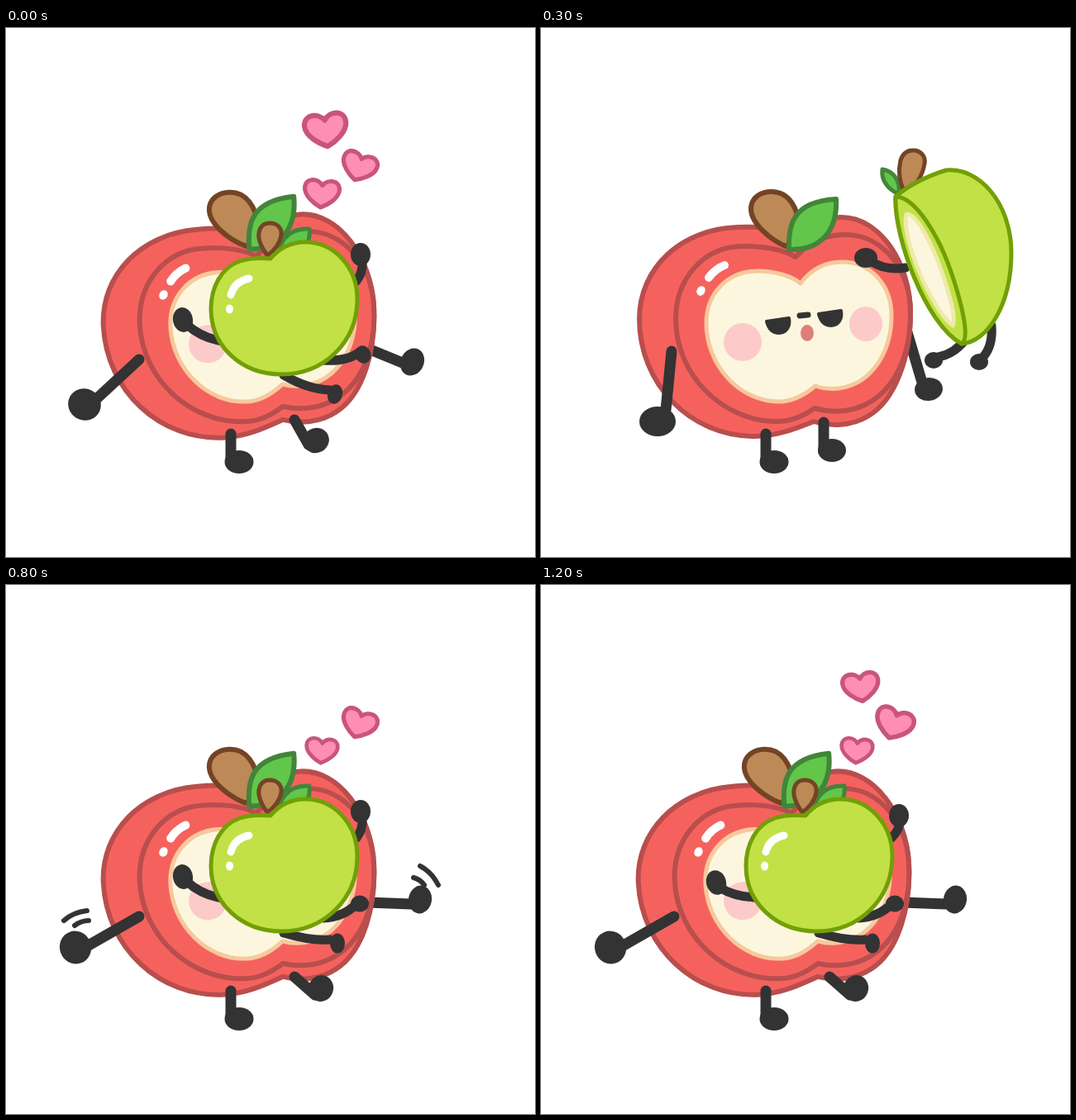
An HTML page for the animation above (1.4 s loop, 640x640 px).

```html
<!DOCTYPE html>
<html lang="en">
<head>
<meta charset="utf-8">
<title>Apple hug</title>
<style>
  html, body { margin: 0; width: 100%; height: 100%; overflow: hidden; background: #fff; }
  svg { display: block; width: 100vw; height: 100vh; }
  path { stroke-linecap: round; stroke-linejoin: round; }
</style>
</head>
<body>
<svg id="stage" viewBox="0 0 640 640" xmlns="http://www.w3.org/2000/svg"></svg>
<script>
const INK = '#333333';
const RED = '#f5625d', RED_LINE = '#b84e4d';
const LIME = '#c1e146', LIME_LINE = '#729f06';
const CREAM = '#fdf6df';
const BARK = '#bd8957', BARK_LINE = '#734424';
const LEAF = '#62c64a', LEAF_LINE = '#42853a';

const shape = (d, fill, line, width) =>
  `<path d="${d}" fill="${fill}" stroke="${line}" stroke-width="${width}"/>`;
const stroke = (d, width, color = INK) => shape(d, 'none', color, width);
const oval = (x, y, rx, ry, fill = INK, turn = 0) =>
  `<ellipse cx="${x}" cy="${y}" rx="${rx}" ry="${ry}" fill="${fill}" transform="rotate(${turn} ${x} ${y})"/>`;
const group = (transform, content) => `<g transform="${transform}">${content}</g>`;
const limb = (d, width, ...end) => stroke(d, width) + oval(...end);

function redBody() {
  return shape('M306 252C285 240 258 240 238 241C170 243 119 290 119 352C119 430 180 494 258 494C285 494 307 485 330 476C350 482 375 482 395 470C430 450 447 395 447 345C447 285 410 229 364 229C340 229 322 238 306 252Z', RED, RED_LINE, 6)
    + shape('M308 277C290 266 265 264 245 264C195 264 163 305 163 352C163 420 220 476 286 476C303 476 318 469 331 460C345 464 362 465 378 461C425 448 447 400 447 345C447 290 412 250 368 250C342 250 322 262 308 277Z', RED, RED_LINE, 6)
    + shape('M314 309C302 299 280 294 262 294C225 294 200 322 200 357C200 408 240 452 288 452C306 452 320 443 332 433C340 436 350 437 360 436C400 431 424 392 424 348C424 310 398 283 364 283C343 283 326 293 314 309Z', CREAM, '#f6c99d', 5)
    + oval(244, 380, 23, 23, '#fdcaca') + oval(393, 358, 20, 21, '#fdcaca')
    + oval(322, 369, 8, 10, '#dc8077')
    + shape('M273 355L300 351C302 362 296 369 288 369C280 369 275 363 273 355Z', INK, INK, 4)
    + shape('M336 346L363 342C365 353 359 360 351 360C343 360 338 354 336 346Z', INK, INK, 4)
    + stroke('M313 348L323 347', 7)
    + stroke('M203 302Q210 292 222 287', 10, '#fff') + oval(193.5, 318, 5, 6, '#fff', 30)
    + shape('M296 264C275 255 254 235 254 219C254 205 266 198 279 198C300 198 311 218 312 240C313 255 300 262 296 264Z', BARK, BARK_LINE, 6)
    + shape('M300 268C299 240 303 210 357 207C359 245 338 270 300 268Z', LEAF, LEAF_LINE, 6);
}

const RED_POSES = {
  stand: {
    back: limb('M443 368L462 432', 13, 469, 437, 17, 14, INK, -8),
    front: limb('M158 391L151 462', 13, 141, 476, 22, 18)
      + limb('M342 477V513', 13, 352, 511, 17, 14)
  },
  low: {
    back: limb('M438 388L482 406', 13, 491.5, 404, 14, 17, INK, 25),
    front: limb('M161 401L108 450', 13, 95, 455.5, 20, 19, INK, 25)
      + limb('M349 474L366 504', 13, 375, 499, 16, 15, INK, -25)
  },
  high: {
    back: limb('M438 384L490 386', 13, 501, 380.5, 14, 17, INK, 10),
    front: limb('M161 401L98 437', 13, 84, 438.5, 19, 20, INK, -20)
      + limb('M349 474L374 496', 13, 381, 488, 15, 16, INK, 20)
  }
};

function red(pose) {
  const { back, front } = RED_POSES[pose];
  const lean = pose === 'stand' ? 0 : -2.9;
  return back + group(`rotate(${lean} 290 380)`, redBody()) + front
    + limb('M272 491V525', 13, 282, 525, 17.5, 14);
}

const HANDS = {
  up: [
    limb('M262 379Q236 375 218 358', 11, 214, 353, 12, 15, INK, -10),
    limb('M424 306Q432 296 431 282', 11, 429, 274, 12, 14)
  ],
  down: [
    limb('M262 378Q236 378 216 366', 11, 212, 360, 12, 15, INK, -15),
    limb('M424 306Q434 296 434 286', 11, 433, 279, 12, 14)
  ]
};
const FEET = {
  low: limb('M384 402Q412 404 428 392', 11, 432, 395, 9.5, 11, INK, -20)
    + limb('M336 420Q365 437 392 438', 11, 398, 443, 9, 12, INK, 15),
  high: limb('M384 403Q408 402 424 386', 11, 428, 385.5, 11, 10)
    + limb('M336 421Q370 431 392 429', 11, 401, 433.5, 9, 12)
};

function lime(hands, feet, x = 0, y = 0, oneHand = false) {
  const [near, far] = HANDS[hands];
  return group(`translate(${x} ${y})`,
    near + (oneHand ? '' : far) + FEET[feet]
    + shape('M330 270C335 250 348 242 367 243C368 252 366 262 358 270Z', LEAF, LEAF_LINE, 5)
    + shape('M316 275C308 264 305 254 306 248C307 240 312 236 319 236C328 236 334 242 333 250C332 260 324 270 316 275Z', BARK, BARK_LINE, 5)
    + shape('M320 279C308 278 295 278 283 282C260 290 248 314 248 340C248 385 285 419 333 419C385 419 425 380 425 328C425 290 398 259 362 259C343 259 330 267 320 279Z', LIME, LIME_LINE, 5)
    + stroke('M272 323Q276 307 294 303', 9, '#fff') + oval(270.5, 340, 4.5, 5.5, '#fff'));
}

// Side view of the green apple, cut off at the right border of its scene.
function limeSide(x, y, limbs = '') {
  return '<g clip-path="url(#scene)">' + group(`translate(${x} ${y})`, limbs
    + shape('M528 211C516 206 506 195 508 181C521 183 530 194 528 211Z', LEAF, LEAF_LINE, 5)
    + shape('M534 207C528 195 527 183 530 170C533 161 538 158 545 158C554 158 561 165 559 174C557 188 549 200 540 207Z', BARK, BARK_LINE, 5)
    + shape('M524 214C540 200 560 190 585 182C625 178 664 222 664 282C664 345 635 390 604 392C560 368 522 262 524 214Z', LIME, LIME_LINE, 5)
    + shape('M524 214C548 214 576 262 590 302C605 345 614 386 604 392C560 368 522 262 524 214Z', LIME, LIME_LINE, 5)
    + shape('M537 235C550 234 568 272 580 305C590 335 598 362 593 370C568 352 530 262 537 235Z', CREAM, '#eeeaa9', 5)) + '</g>';
}

function heart(x, y, turn, size) {
  return group(`translate(${x} ${y}) rotate(${turn}) scale(${size})`,
    shape('M0 16.5C-8 13 -21 4 -21 -6C-21 -18 -6 -19 0 -10C6 -19 21 -18 21 -6C21 4 8 13 0 16.5Z', '#ff8eb3', '#c9547d', 5.2));
}
const hearts = (...sizes) => sizes.map((size, i) =>
  heart(...[[382, 200.5, 5], [427, 168, 19], [387, 123.5, -7]][i], size)).join('');

const lines = (...paths) => paths.map(d => stroke(d, 6)).join('');
const swishLow = lines('M521 416Q515 438 504 454', 'M501 433Q498 441 493 447',
  'M83 489Q95 501 114 506', 'M102 487Q108 492 117 494');
const swishHigh = lines('M501 340Q515 347 523 363', 'M493 354Q501 356 506 363',
  'M70 406Q81 396 98 394', 'M83 412Q91 406 100 406');

const leapLimbs = limb('M536 300Q512 304 494 292', 11, 488, 288, 14, 12)
  + limb('M610 385Q596 404 576 408', 11, 570, 412, 11, 10)
  + limb('M640 370Q642 394 630 408', 11, 625, 414, 11, 10);

// [start ms, picture]
const steps = [
  [0, red('low') + lime('up', 'low') + hearts(1, 1, 1.2)],
  [200, red('stand') + limeSide(0, 0)],
  [300, red('stand') + limeSide(-95, -10, leapLimbs)],
  [400, red('stand') + lime('down', 'low', 77, -17, true)],
  [600, red('low') + lime('down', 'low') + swishLow + hearts(1)],
  [800, red('high') + lime('up', 'high') + swishHigh + hearts(0.9, 1)],
  [1000, red('low') + lime('up', 'low') + hearts(1, 1)],
  [1200, red('high') + lime('down', 'high') + hearts(0.9, 1.08, 1.03)]
];
const LOOP = 1400;

const stage = document.getElementById('stage');
stage.innerHTML = '<clipPath id="scene"><rect width="576" height="640"/></clipPath>'
  + steps.map(([, picture]) => `<g class="step" display="none">${picture}</g>`).join('');
const pictures = [...stage.querySelectorAll('.step')];

const begin = performance.now();
function draw(now) {
  const time = Math.max(0, now - begin) % LOOP;
  const current = steps.filter(([start]) => start <= time).length - 1;
  pictures.forEach((p, i) => p.setAttribute('display', i === current ? 'inline' : 'none'));
  requestAnimationFrame(draw);
}
draw(begin);
</script>
</body>
</html>
```
